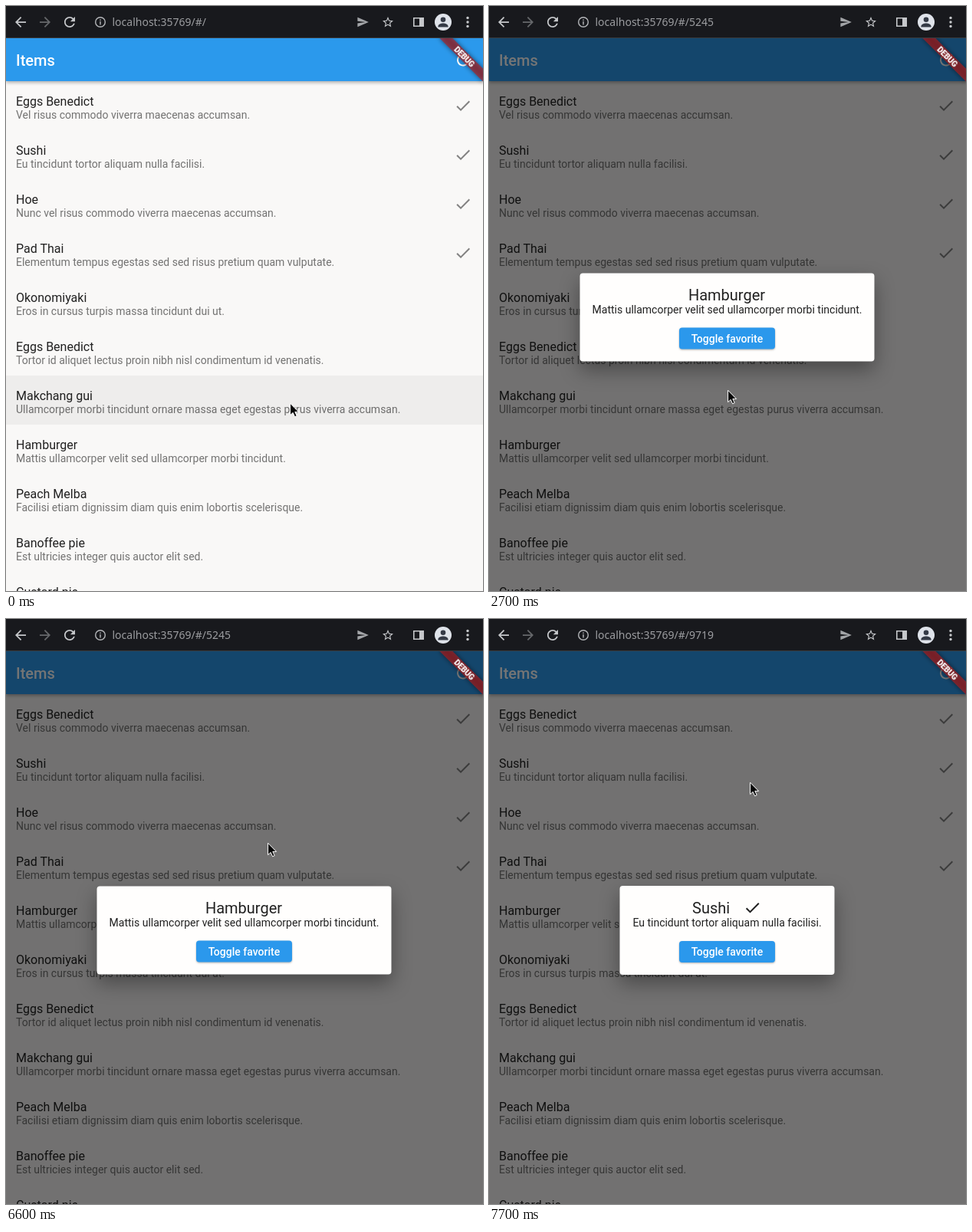
Write an HTML page that moves like this. It is 622 px wide and 763 px high and loops after 8 s.

```html
<!DOCTYPE html>
<html lang="en">
<head>
<meta charset="utf-8">
<title>Items</title>
<style>
html, body { margin: 0; width: 100%; height: 100%; overflow: hidden; background: #f9f8f7; }
svg { display: block; }
text { font-family: Roboto, sans-serif; white-space: pre; }
.url { font: 14px "Noto Sans", "Open Sans", sans-serif; fill: #9c9da0; }
.name { font-size: 16px; fill: rgba(0,0,0,.87); }
.sub { font-size: 14px; fill: rgba(0,0,0,.54); }
.big { font-size: 20px; fill: rgba(0,0,0,.87); }
.body { font-size: 14px; fill: rgba(0,0,0,.87); }
.label { font-size: 14px; font-weight: 500; fill: #fff; }
.mid { text-anchor: middle; }
.bar { fill: #2b99ec; filter: drop-shadow(0 2px 2px rgba(0,0,0,.3)); }
.card { fill: #fffefd; filter: drop-shadow(0 11px 13px rgba(0,0,0,.36)); }
.button { fill: #2b98ec; filter: drop-shadow(0 1.5px 1px rgba(0,0,0,.3)); }
.band { fill: rgba(183,28,28,.63); }
.bandShade { fill: rgba(0,0,0,.5); filter: blur(3px); }

/* One 8 s clock; 100 ms = 1.25 % */
.t { animation: 8s step-end -10ms infinite; }
.cursor { animation-name: cursor; }
.ink { animation-name: ink; }
.hover { animation-name: hover; }
.splash { animation-name: splash; }
.barrier { animation-name: barrier; }
.first { animation-name: first; }
.second { animation-name: second; }
.urlHome { animation-name: urlHome; }
.urlFirst { animation-name: urlFirst; }
.urlSecond { animation-name: urlSecond; }
.down { animation-name: down; }
.up { animation-name: up; }
.marked { animation-name: marked; }
.plain { animation-name: plain; }
.idle { animation-name: idle; }
.busy { animation-name: busy; }
.warm { animation-name: warm; }

@keyframes cursor {
  0% { transform: translate(370px,517px); }
  1.25% { transform: translate(362px,548px); }
  3.75% { transform: translate(351px,570px); }
  5% { transform: translate(338px,585px); }
  7.5% { transform: translate(328px,584px); }
  8.75% { transform: translate(315px,580px); }
  10% { transform: translate(308px,578px); }
  30% { transform: translate(308px,570px); }
  31.25% { transform: translate(309px,552px); }
  32.5% { transform: translate(310px,528px); }
  33.75% { transform: translate(311px,500px); }
  35% { transform: translate(313px,473px); }
  36.25% { transform: translate(315px,452px); }
  37.5% { transform: translate(317px,437px); }
  38.75% { transform: translate(318px,429px); }
  42.5% { transform: translate(325px,430px); }
  78.75% { transform: translate(346px,380px); }
  80% { transform: translate(358px,320px); }
  82.5% { transform: translate(341px,291px); }
  90% { transform: translate(345px,250px); }
  91.25% { transform: translate(340px,212px); }
}
@keyframes ink {
  0% { transform: translateY(482px); }
  1.25% { transform: translateY(546px); }
  85% { transform: translateY(290px); }
  90% { transform: translateY(226px); }
  91.25% { transform: translateY(162px); }
}
@keyframes hover {
  0%, 85% { opacity: .042; }
  21.25%, 93.75% { opacity: .068; }
  22.5%, 95% { opacity: .02; }
  23.75%, 96.25% { opacity: 0; }
}
@keyframes splash {
  0%, 23.75%, 96.25% { opacity: 0; }
  21.25% { opacity: .055; r: 17px; cx: 309px; cy: 32px; }
  22.5% { opacity: .065; r: 105px; cx: 309px; cy: 32px; }
  93.75% { opacity: .055; r: 17px; cx: 341px; cy: 51px; }
  95% { opacity: .065; r: 105px; cx: 341px; cy: 51px; }
}
@keyframes barrier {
  0%, 86.25% { opacity: 0; }
  22.5%, 95% { opacity: .5; }
  23.75%, 96.25% { opacity: .54; }
  85% { opacity: .315; }
}
@keyframes first {
  0%, 86.25% { opacity: 0; }
  22.5% { opacity: .84; }
  23.75% { opacity: 1; }
  85% { opacity: .5; }
}
@keyframes second { 0% { opacity: 0; } 95% { opacity: .84; } 96.25% { opacity: 1; } }
@keyframes urlHome { 0%, 85% { opacity: 1; } 21.25%, 93.75% { opacity: 0; } }
@keyframes urlFirst { 0%, 85% { opacity: 0; } 21.25% { opacity: 1; } }
@keyframes urlSecond { 0% { opacity: 0; } 93.75% { opacity: 1; } }
@keyframes down { 0% { transform: none; } 51.25% { transform: translateY(64px); } }
@keyframes up { 0% { transform: none; } 51.25% { transform: translateY(-192px); } }
@keyframes marked { 0%, 72.5% { opacity: 0; } 51.25% { opacity: 1; } }
@keyframes plain { 0%, 72.5% { opacity: 1; } 51.25% { opacity: 0; } }
@keyframes idle { 0%, 51.25%, 72.5% { opacity: 1; } 46.25%, 67.5% { opacity: 0; } }
@keyframes warm { 0%, 78.75% { fill: #2b98ec; } 37.5% { fill: #3a9fee; } }
@keyframes busy {
  0%, 51.25%, 72.5% { opacity: 0; }
  46.25%, 67.5% { opacity: 1; transform: rotate(-73.8deg); stroke-dasharray: 18 360; }
  47.5%, 68.75% { opacity: 1; transform: rotate(-57.6deg); stroke-dasharray: 99 360; }
  48.75%, 70% { opacity: 1; transform: rotate(-41.4deg); stroke-dasharray: 190 360; }
  50%, 71.25% { opacity: 1; transform: rotate(-25.2deg); stroke-dasharray: 236 360; }
}
</style>
</head>
<body>
<svg width="622" height="763" viewBox="0 0 622 763">
  <defs>
    <path id="check" d="M9 16.17 4.83 12l-1.42 1.41L9 19 21 7l-1.41-1.41z"/>
    <path id="arrow" d="M8 -1H-4.17L1.42-6.59 0-8-8 0 0 8 1.41 6.59-4.17 1H8z"/>
    <path id="reload" d="M17.65 6.35C16.2 4.9 14.21 4 12 4c-4.42 0-7.99 3.58-7.99 8s3.57 8 7.99 8c3.73 0 6.84-2.55 7.73-6h-2.08c-.82 2.33-3.04 4-5.65 4-3.31 0-6-2.69-6-6s2.69-6 6-6c1.66 0 3.14.69 4.22 1.78L13 11h7V4z"/>
  </defs>
  <rect width="622" height="763" fill="#f9f8f7"/>

  <g class="t ink">
    <rect class="t hover" width="622" height="64"/>
    <svg width="622" height="64" overflow="hidden"><circle class="t splash"/></svg>
  </g>
  <g id="list"></g>

  <rect class="bar" y="42" width="622" height="56"/>
  <text x="13" y="78" font-size="20" font-weight="500" fill="#fff">Items</text>
  <use href="#reload" x="584" y="58.5" fill="#fff"/>

  <rect class="t barrier" y="42" width="622" height="721"/>

  <g class="t first">
    <g class="t plain">
      <rect class="card" x="118.5" y="348.5" width="384" height="115" rx="4"/>
      <text class="big mid" x="310" y="384">Hamburger</text>
    </g>
    <g class="t marked">
      <rect class="card" x="118.5" y="348" width="384" height="116" rx="4"/>
      <text class="big" x="239" y="384">Hamburger</text>
      <use href="#check" x="357" y="364.5" opacity=".87"/>
    </g>
    <text class="body mid" x="310.5" y="401">Mattis ullamcorper velit sed ullamcorper morbi tincidunt.</text>
    <g class="t idle">
      <rect class="button t warm" x="248" y="419.5" width="125" height="28" rx="4"/>
      <text class="label mid" x="310.5" y="439">Toggle favorite</text>
    </g>
    <g transform="translate(310.5 433.5)">
      <circle class="t busy" r="14" pathLength="360" fill="none" stroke="#2b98ec" stroke-width="4" stroke-linecap="square"/>
    </g>
  </g>

  <g class="t second">
    <rect class="card" x="170.5" y="348" width="280" height="116" rx="4"/>
    <text class="big" x="265" y="384">Sushi</text>
    <use href="#check" x="331.5" y="364.5" opacity=".87"/>
    <text class="body mid" x="310.5" y="401">Eu tincidunt tortor aliquam nulla facilisi.</text>
    <rect class="button" x="248" y="420" width="125" height="28" rx="4"/>
    <text class="label mid" x="310.5" y="439">Toggle favorite</text>
  </g>

  <svg y="42" width="622" height="100" overflow="hidden">
    <g transform="translate(622 0) rotate(45)">
      <rect class="bandShade" x="-40" y="28" width="80" height="12"/>
      <rect class="band" x="-40" y="28" width="80" height="12"/>
      <text class="mid" y="37.6" font-size="10.2" font-weight="900" fill="#fff">DEBUG</text>
    </g>
  </svg>

  <rect width="622" height="42" fill="#18191d"/>
  <rect y="41" width="622" height="1" fill="#393a3d"/>
  <g fill="#c6c8cb">
    <use href="#arrow" transform="translate(19 21) scale(.875)"/>
    <use href="#arrow" transform="translate(51 21) scale(-.875 .875)" fill="#66686b"/>
    <use href="#reload" transform="translate(72.5 10.5) scale(.875)"/>
    <path transform="translate(457 12.8) scale(.69)" fill="#a3a5a8" d="M2.01 21 23 12 2.01 3 2 10l15 2-15 2z"/>
    <path transform="translate(489.6 12.7) scale(.7)" d="M22 9.24l-7.19-.62L12 2 9.19 8.63 2 9.24l5.46 4.73L5.82 21 12 17.27 18.18 21l-1.63-7.03zM12 15.4l-3.76 2.27 1-4.28-3.32-2.88 4.38-.38L12 6.1l1.71 4.04 4.38.38-3.32 2.88 1 4.28z"/>
    <path d="M531 15h14v12h-14zM532.6 16.6v8.8h6.4v-8.8z" fill-rule="evenodd"/>
    <circle cx="570" cy="21" r="11" fill="#dfe3ea"/>
    <g fill="#343a46">
      <circle cx="570" cy="17.8" r="3.3"/>
      <path d="M563.4 26.6c0-3 4.2-4.2 6.6-4.2s6.6 1.2 6.6 4.2v.9h-13.2z"/>
    </g>
    <circle cx="602" cy="15.5" r="1.7"/>
    <circle cx="602" cy="21" r="1.7"/>
    <circle cx="602" cy="26.5" r="1.7"/>
    <circle cx="123" cy="21" r="6.3" fill="none" stroke="#b4b6b9" stroke-width="1.4"/>
    <path d="M122.3 20h1.4v4.4h-1.4zM122.3 17.4h1.4v1.5h-1.4z" fill="#b4b6b9"/>
  </g>
  <text class="url t urlHome" x="138.5" y="26">localhost:35769/#/</text>
  <text class="url t urlFirst" x="138.5" y="26">localhost:35769/#/5245</text>
  <text class="url t urlSecond" x="138.5" y="26">localhost:35769/#/9719</text>

  <g class="t cursor">
    <path d="M.6 1.2V16.6L4.2 13.4 6.6 18.8 9.2 17.6 6.8 12.4H11.6z" fill="#050505" stroke="#fff" stroke-width="1"/>
  </g>
</svg>
<script>
const items = [
  ["Eggs Benedict", "Vel risus commodo viverra maecenas accumsan."],
  ["Sushi", "Eu tincidunt tortor aliquam nulla facilisi."],
  ["Hoe", "Nunc vel risus commodo viverra maecenas accumsan."],
  ["Pad Thai", "Elementum tempus egestas sed sed risus pretium quam vulputate."],
  ["Okonomiyaki", "Eros in cursus turpis massa tincidunt dui ut."],
  ["Eggs Benedict", "Tortor id aliquet lectus proin nibh nisl condimentum id venenatis."],
  ["Makchang gui", "Ullamcorper morbi tincidunt ornare massa eget egestas purus viverra accumsan."],
  ["Hamburger", "Mattis ullamcorper velit sed ullamcorper morbi tincidunt."],
  ["Peach Melba", "Facilisi etiam dignissim diam quis enim lobortis scelerisque."],
  ["Banoffee pie", "Est ultricies integer quis auctor elit sed."],
  ["Custard pie", ""]
];
const TOGGLED = 7, FAVORITES = 4;

function row([name, sub], i) {
  const y = 98 + i * 64;
  const move = i === TOGGLED ? "t up" : i >= FAVORITES && i < TOGGLED ? "t down" : "";
  const tick = i < FAVORITES || i === TOGGLED
    ? `<g class="${i === TOGGLED ? "t marked" : ""}"><use href="#check" x="584" y="${y + 20}" opacity=".48"/></g>` : "";
  return `<g class="${move}"><text class="name" x="13" y="${y + 32}">${name}</text>` +
    `<text class="sub" x="13" y="${y + 49}">${sub}</text>${tick}</g>`;
}
document.getElementById("list").innerHTML = items.map(row).join("");
</script>
</body>
</html>
```
